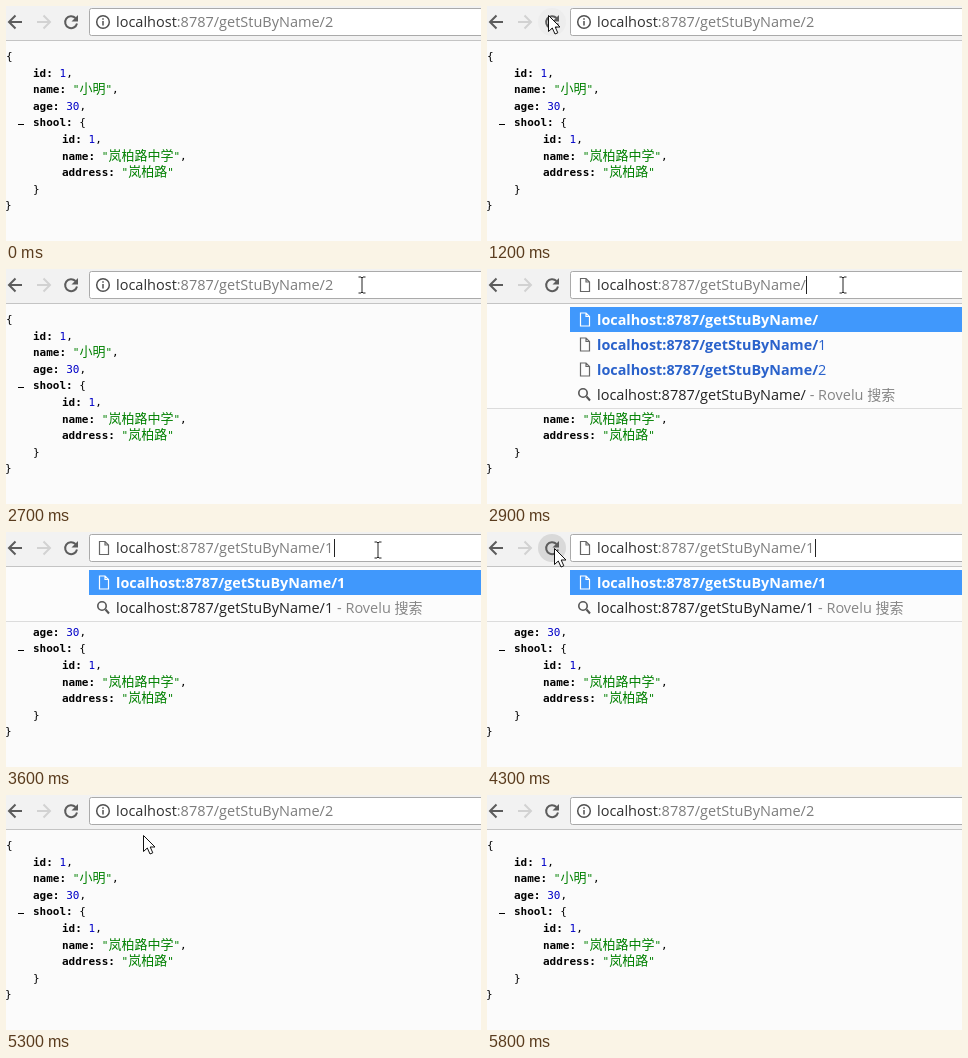
Animation, 475 px wide and 235 px high, one loop 6.1 s. Source, as an HTML page:

```html
<!DOCTYPE html>
<html lang="zh">
<head>
<meta charset="utf-8">
<title>JSON in a browser</title>
<style>
html, body { margin: 0; width: 100%; height: 100%; overflow: hidden; background: #fbfbfb; }
svg { display: block; }
text { white-space: pre; }
.ui { font: 14.5px "Open Sans", "Noto Sans", "Noto Sans CJK SC", sans-serif; }
.b { font-weight: 700; font-size: 14.35px; }
.json { font: 11px "DejaVu Sans Mono", "Noto Sans CJK SC", monospace; fill: #000; }
.k { font-weight: 700; }
.n { fill: #0000c8; }
.s { fill: #008000; }
.zh { font: 13px "Noto Sans CJK SC", sans-serif; }
.line { fill: none; stroke: #5c5c5c; stroke-width: 2; }
</style>
</head>
<body>
<svg id="stage" width="475" height="235" viewBox="0 0 475 235">
  <rect width="475" height="235" fill="#fbfbfb"/>
  <g id="page"></g>
  <g id="list"></g>
  <g id="drop"></g>

  <rect width="475" height="34" fill="#f2f2f2"/>
  <path d="M0 34.5H475" stroke="#c4c4c4"/>
  <circle id="hover" cx="65" cy="16" r="14"/>
  <path class="line" d="M3 16H16M9.5 9.5L3 16L9.5 22.5"/>
  <path class="line" d="M31 16H44M37.500 9.5L44 16L37.500 22.5" style="stroke:#d2d2d2"/>
  <path class="line" d="M69.500 12A6 6 0 1 0 71 17.500"/>
  <path d="M72 9V15.500H65.500Z" fill="#5c5c5c"/>
  <rect x="83.500" y="2.500" width="410" height="27" rx="2" fill="#fff" stroke="#aaa"/>
  <g id="info" fill="none" stroke="#505050" stroke-width="1.5">
    <circle cx="97" cy="16" r="6.300"/>
    <path d="M97 15V19.500M97 12.300V13.700"/>
  </g>
  <g id="doc"></g>
  <rect id="sel" x="110" y="6" width="218" height="19" fill="#3597fd"/>
  <text class="ui" x="110" y="21"><tspan id="host">localhost</tspan><tspan id="path"></tspan></text>
  <rect id="caret" y="7" width="1" height="18" fill="#222"/>

  <path id="arrow" d="M.5 .5V16.500L4.300 13L7 19L9.800 17.800L7.200 12H12Z" fill="#fff" stroke="#111"/>
  <path id="beam" d="M-3.500 -8H-1L0 -7L1 -8H3.500M0 -7V7M-3.500 8H-1L0 7L1 8H3.500" fill="none" stroke="#222"/>
</svg>
<script>
const $ = id => document.getElementById(id);
const show = (id, on) => $(id).setAttribute('display', on ? 'inline' : 'none');
const move = (id, x, y) => $(id).setAttribute('transform', `translate(${x} ${y})`);

const LOOP = 6100, STEP = 100;
const ROUTE = '/getStuByName/', URL_TEXT = 'localhost:8787' + ROUTE;

// JSON fragments
const json = (x, y, body) => `<text class="json" x="${x}" y="${y}">${body}</text>`;
const dash = (x, y) => `<rect x="${x}" y="${y}" width="6" height="1"/>`;
const key = k => `<tspan class="k">${k}:</tspan> `;
const num = (k, v) => `${key(k)}<tspan class="n">${v}</tspan>,`;
const str = (k, v, end = ',') =>
  `${key(k)}<tspan class="s">"<tspan class="zh">${v}</tspan>"</tspan>${end}`;
const person = [num('id', 1), str('name', '小明'), num('age', 30)];
const school = [num('id', 1), str('name', '岚柏路中学'), str('address', '岚柏路', '')];

function drawPage() {
  const rows = [
    [0, '{'], ...person.map(p => [27, p]), [27, key('shool') + '{'],
    ...school.map(p => [56, p]), [27, '}'], [-1, '}']
  ];
  $('page').innerHTML = rows.map(([x, body], i) => json(x, 54 + i * 16.6, body)).join('') +
    dash(12, 118);
}

function drawList() {
  const dots = (x, y) => [0, 4.500, 9].map(d =>
    `<rect x="${x + d}" y="${y}" width="2" height="2"/>`).join('');
  const open = (x, y) => dash(x + 5, y) + json(x, y + 19, '{') + dots(x + 12, y + 14);
  const item = (x, y, body, hollow) => json(x, y, body) +
    `<circle cx="${x - 14.5}" cy="${y - 3.5}" r="2.300" stroke="#000" fill="${hollow ? 'none' : '#000'}" stroke-width="${hollow ? 1 : 0}"/>`;
  $('list').innerHTML = open(0, 50) +
    [...person, key('shool')].map((p, i) => item(68, 99 + i * 16.75, p)).join('') +
    open(68.5, 160) +
    school.map((p, i) => item(135.5, 196 + i * 16.8, p, true)).join('');
}

// Address bar suggestions
const sheet = (y, color) =>
  `<path d="M93.500 ${y - 6.500}H99L102.500 ${y - 3}V${y + 6.500}H93.500ZM99 ${y - 6.500}V${y - 3}H102.500" fill="none" stroke="${color}" stroke-width="1.200"/>`;
const lens = y =>
  `<path d="M99.500 ${y + 2}L103 ${y + 6}" stroke="#555" stroke-width="2"/><circle cx="96" cy="${y - 1.500}" r="4.200" fill="none" stroke="#555" stroke-width="1.600"/>`;
const label = (y, color, body) =>
  `<text class="ui" x="110" y="${y + 5}" fill="${color}">${body}</text>`;
const bold = s => `<tspan class="b">${s}</tspan>`;

function suggestions(typed) {
  const links = typed ? [] : [1, 2];
  const ys = i => 50.5 + i * 25;
  const last = ys(links.length + 1), bottom = last + 14;
  return `<rect y="35" width="475" height="${bottom - 35}" fill="#fcfcfc"/>` +
    `<path d="M0 ${bottom}H475" stroke="#dcdcdc"/>` +
    '<rect x="83" y="38" width="392" height="25" fill="#4098fc"/>' +
    sheet(50.5, '#fff') + label(50.5, '#fff', bold(URL_TEXT + typed)) +
    links.map((n, i) => sheet(ys(i + 1), '#666') +
      label(ys(i + 1), '#2a62cb', bold(URL_TEXT) + n)).join('') +
    lens(last) + label(last, '#222',
      `${URL_TEXT}${typed}<tspan fill="#858585"> - Rovelu <tspan style="font-size:14px">搜索</tspan></tspan>`);
}

// Pointer path: time, x, y
const POINTER = [
  [100, 204, 20], [300, 320, 36], [400, 396, 38], [700, 289, 34], [1000, 140, 33],
  [1200, 61, 9], [1400, 47, 0], [1500, 62, 10], [1600, 120, 33], [1800, 270, 34],
  [2000, 355, 18], [2300, 355, 18], [2400, 356, 16], [3500, 356, 16], [3600, 372, 18],
  [3700, 355, 33], [4000, 150, 33], [4200, 66, 23], [4300, 67, 16], [5100, 67, 16],
  [5200, 90, 30], [5400, 183, 50], [5600, 415, 58], [5700, 461, 60]
];

function pointerAt(t) {
  const i = POINTER.findIndex(p => p[0] >= t);
  if (i < 0 || t < POINTER[0][0]) return null;
  const b = POINTER[i], a = POINTER[Math.max(0, i - 1)];
  const f = b === a ? 0 : (t - a[0]) / (b[0] - a[0]);
  return [1, 2].map(n => a[n] + (b[n] - a[n]) * f);
}

let lastDrop = null;

function render(time) {
  const t = Math.floor(time % LOOP / STEP) * STEP;
  const within = (a, b) => t >= a && t < b;
  const editing = within(2900, 4600);
  const selected = within(2000, 2200);
  const typed = !editing ? '2' : t < 3100 ? '' : '1';

  show('list', within(4800, 4900));
  show('page', !within(4700, 4900));
  show('drop', editing);
  if (editing && typed !== lastDrop) $('drop').innerHTML = suggestions(lastDrop = typed);

  show('info', !editing);
  show('doc', editing);
  show('sel', selected);
  $('host').setAttribute('fill', selected ? '#fff' : '#303030');
  $('path').setAttribute('fill', selected ? '#fff' : '#7c7c7c');
  $('path').textContent = ':8787' + ROUTE + typed;
  show('caret', within(2200, 2700) || editing);
  $('caret').setAttribute('x', typed ? 328 : 319);

  const p = pointerAt(t);
  const beam = p && p[0] > 84 && p[1] < 30;
  show('arrow', p && !beam);
  show('beam', beam);
  show('hover', p && p[0] > 50 && p[0] < 79 && p[1] < 30);
  $('hover').setAttribute('fill', t < 4200 ? '#ededed' : '#d9d9d9');
  if (p) move(beam ? 'beam' : 'arrow', Math.round(p[0]), Math.round(p[1]));
}

drawPage();
drawList();
$('doc').innerHTML = sheet(16, '#666');
const start = performance.now();
(function tick() {
  render(performance.now() - start);
  requestAnimationFrame(tick);
})();
</script>
</body>
</html>
```
